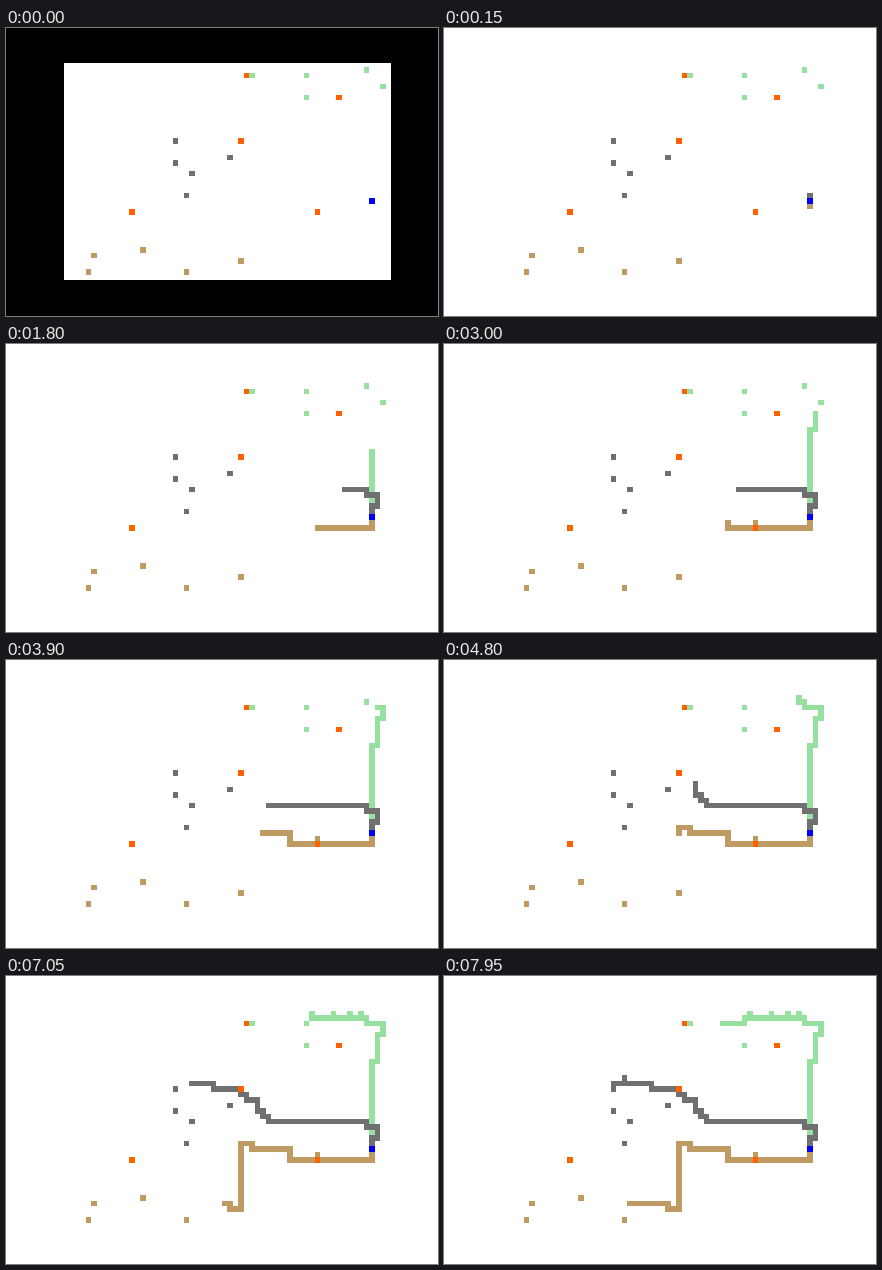
Write an HTML page with a canvas that moves like this. It is 432x288 px and loops after 8 s.

```html
<!DOCTYPE html>
<html lang="en">
<head>
<meta charset="utf-8">
<title>Grid walkers</title>
<style>
html, body { margin: 0; width: 100%; height: 100%; overflow: hidden; background: #fff; }
canvas { display: block; width: 432px; height: 288px; }
</style>
</head>
<body>
<canvas id="stage" width="432" height="288"></canvas>
<script>
const ctx = document.getElementById('stage').getContext('2d');
const LOOP = 8000, STEP = 150;
const COLS = 60, ROWS = 40, CELL = 5.4517;
const HOME = [56, 25];
const DIRS = { U: [0, -1], D: [0, 1], L: [-1, 0], R: [1, 0] };

// Cell edges snap to whole pixels.
const edgeX = c => Math.round(57.85 + c * CELL);
const edgeY = r => Math.max(35, Math.floor(34.45 + r * CELL));

function fillCells(color, [c, r], w = 1, h = 1) {
  const x = edgeX(c), y = edgeY(r);
  ctx.fillStyle = color;
  ctx.fillRect(x, y, edgeX(c + w) - x, edgeY(r + h) - y);
}

const obstacles = [[33, 2], [50, 6], [12, 27]];

// A route is a chain of legs such as "L3"; a leg ending in * reaches a goal,
// one ending in ! reaches an obstacle.
function walker(color, route, goals) {
  const path = [];
  let [c, r] = HOME;
  for (const [, dir, count, mark] of route.matchAll(/([UDLR])(\d*)([*!]?)/g)) {
    const [dx, dy] = DIRS[dir];
    for (let n = +count || 1; n > 0; n--) path.push([c += dx, r += dy]);
    if (mark) (mark === '*' ? goals : obstacles).push([c, r]);
  }
  return { color, path, goals };
}

const bump = n => `L${n} U D `;
const stair = n => `U${n} L${n} `;
const repeat = (leg, ...sizes) => sizes.map(leg).join('');

const walkers = [
  walker('#96e0a0',
    `U16 R U5 R* U2 L3 U* ${repeat(bump, 1, 2, 3, 4)} L D* L4`,
    [[34, 2], [44, 6]]),
  walker('#707070',
    `U2 R U2 L2 U L18 ${repeat(stair, 1, 1, 2, 1)} U! L5 U L5 U D L2 D*`,
    [[20, 18], [23, 20], [30, 17], [22, 24]]),
  walker('#bf9b63',
    'D2 L10! U D L5 U2 L7 U L2 D12* L2 U L7',
    [[14, 34], [5, 35], [4, 38], [22, 38]])
];

function draw(step) {
  ctx.fillStyle = step ? '#fff' : '#000';
  ctx.fillRect(0, 0, 432, 288);
  fillCells('#fff', [0, 0], COLS, ROWS);

  for (const { color, goals, path } of walkers) {
    for (const cell of [...goals, ...path.slice(0, step)]) fillCells(color, cell);
  }
  for (const cell of obstacles) fillCells('#ff6000', cell);
  // A walker covers an obstacle only while standing on it.
  for (const { color, path } of walkers) fillCells(color, path[step - 1] || HOME);
  fillCells('#0000ff', HOME);
}

const start = performance.now();
function tick() {
  const t = (performance.now() - start) % LOOP;
  draw(Math.floor(t / STEP));
  requestAnimationFrame(tick);
}
tick();
</script>
</body>
</html>
```
